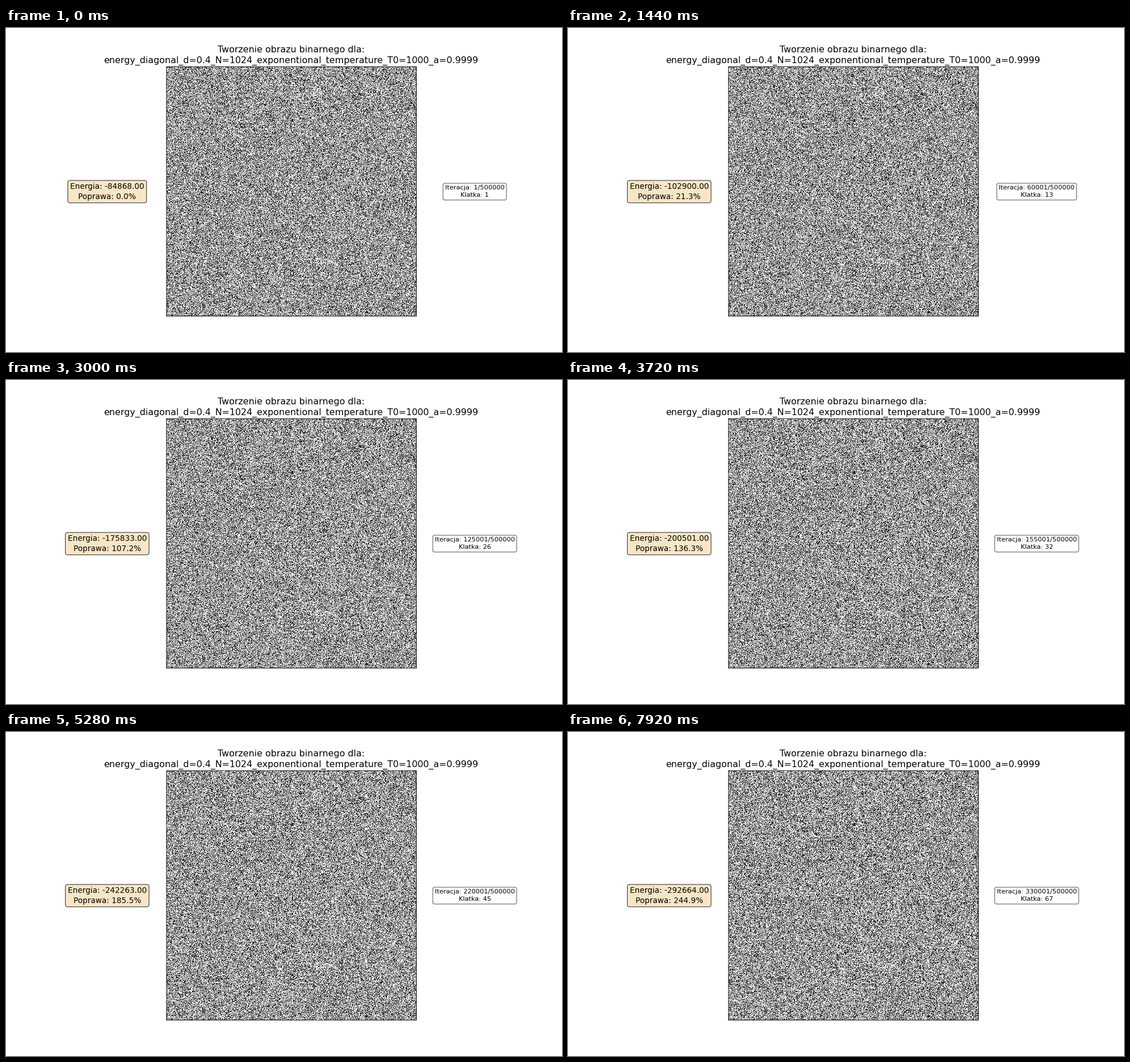
These frames come from a looping animation (980x572 px, 8000 ms). A matplotlib script:

```python
import numpy as np
import matplotlib.pyplot as plt
from matplotlib.animation import FuncAnimation

W, H = 980, 572
DPI = 80
S = W / 12 / DPI            # keeps the proportions of a 12 inch wide layout
N = 1024                    # side of the binary lattice
SAMPLES = 539               # lattice cells picked per side
VIEW = 440                  # side of the drawn lattice in pixels
STEP = 5000                 # annealing iterations per picture
TOTAL = 500000
COUNT = 67                  # pictures in the loop
TICK = 40                   # ms; each picture holds for three ticks
T0, ALPHA = 1000, 0.9999
START_ENERGY = -84860

plt.rcParams.update({
    "font.family": "DejaVu Sans",
    "axes.linewidth": 0.8 * S,
    "patch.linewidth": 1.0 * S,
})


def neighbours(spins, y, x):
    """Sum of the four diagonal neighbours, wrapping at the borders."""
    up, down, left, right = (y - 1) % N, (y + 1) % N, (x - 1) % N, (x + 1) % N
    return (spins[up, left] + spins[up, right]
            + spins[down, left] + spins[down, right])


def anneal(spins, first, rng):
    """Try STEP swaps of random pixel pairs, cooling all the while."""
    sites = rng.choice(N * N, 2 * STEP, replace=False)
    y, x = np.divmod(sites.reshape(2, STEP), N)
    s = spins[y, x]
    delta = (2 * s * neighbours(spins, y, x)).sum(axis=0)
    temp = T0 * ALPHA ** (first + np.arange(STEP))
    chance = np.exp(np.minimum(0, -delta / temp))
    ok = (s[0] != s[1]) & (rng.random(STEP) < chance)
    spins[y[:, ok], x[:, ok]] = -s[:, ok]


def lanczos(size, target):
    """Matrix that shrinks a line of `size` values to `target` values."""
    scale = size / target
    centers = (np.arange(target) + 0.5) * scale - 0.5
    d = (np.arange(size) - centers[:, None]) / scale
    weights = np.where(abs(d) < 3, np.sinc(d) * np.sinc(d / 3), 0)
    return (weights / weights.sum(axis=1, keepdims=True)).astype(np.float32)


def run():
    rng = np.random.default_rng(7)
    spins = np.where(rng.random((N, N)) < 0.4, -1, 1)
    pick = ((np.arange(SAMPLES) + 0.5) * N / SAMPLES).astype(int)
    shrink = lanczos(SAMPLES, VIEW)
    views = []
    for k in range(COUNT):
        cells = (spins[np.ix_(pick, pick)] > 0).astype(np.float32)
        views.append(np.clip(shrink @ cells @ shrink.T, 0, 1))
        anneal(spins, k * STEP, rng)
    return views


def progress(k):
    """Slow start while hot, then logarithmic gain once cooled."""
    cooled = np.log1p(np.exp((np.asarray(k) * STEP - 51000) / 10000))
    return np.log1p(cooled / 8)


KNOTS = [0, 12, 19, 31, 44, 53, 66]
LEVELS = [-84868, -102900, -145928, -200501, -242263, -264843, -292664]
energies = np.round(np.interp(progress(np.arange(COUNT)),
                              progress(KNOTS), LEVELS))
views = run()

fig, (left, ax, right) = plt.subplots(
    1, 3, figsize=(W / DPI, H / DPI), dpi=DPI,
    gridspec_kw={"width_ratios": [1, 4, 1]})
left.axis("off")
right.axis("off")

picture = ax.imshow(views[0], cmap="gray", vmin=0, vmax=1, aspect="auto",
                    interpolation="nearest")
ax.set_position([282.9 / W, 63.3 / H, 440.4 / W, 440.4 / H])
ax.set_xticks([])
ax.set_yticks([])
for spine in ax.spines.values():
    spine.set_snap(False)
ax.set_title("Tworzenie obrazu binarnego dla:\n"
             "energy_diagonal_d=0.4_N=1024_exponentional_temperature"
             "_T0=1000_a=0.9999",
             x=0.498, fontsize=14 * S, pad=6 * S, linespacing=1.25)


def label(panel, size, spacing, color, alpha):
    return panel.text(0.5, 0.5, "", transform=panel.transAxes,
                      ha="center", va="center", fontsize=size * S,
                      linespacing=spacing,
                      bbox=dict(boxstyle="round", facecolor=color,
                                alpha=alpha))


energy_label = label(left, 12, 1.3, "wheat", 0.75)
count_label = label(right, 10, 1.35, "white", 0.6)


def update(tick):
    k = tick // 3
    energy = energies[k]
    gain = (START_ENERGY - energy) / abs(START_ENERGY) * 100
    picture.set_data(views[k])
    energy_label.set_text(f"Energia: {energy:.2f}\nPoprawa: {gain:.1f}%")
    count_label.set_text(f"Iteracja: {k * STEP + 1}/{TOTAL}\nKlatka: {k + 1}")
    return picture, energy_label, count_label


anim = FuncAnimation(fig, update, frames=200, interval=TICK, repeat=True,
                     repeat_delay=0, blit=False, cache_frame_data=False)
plt.show()
```
